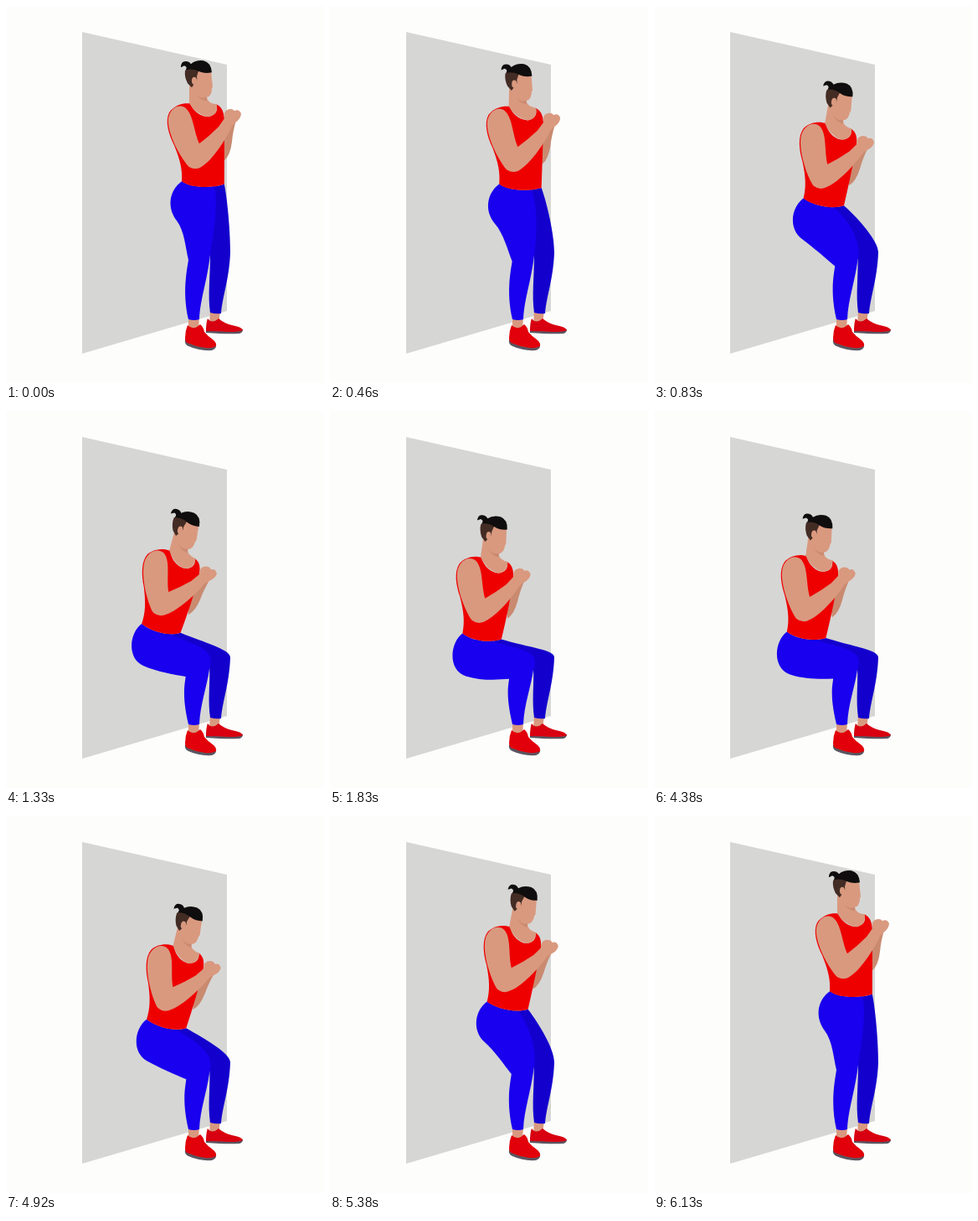
An HTML page that plays this animation: 380 px wide and 450 px high, repeating every 6180 ms.

```html
<!DOCTYPE html>
<html lang="en">
<head>
<meta charset="utf-8">
<title>Wall squat</title>
<style>
html, body { margin: 0; width: 100%; height: 100%; overflow: hidden; background: #fdfdfc; }
svg { display: block; width: 380px; height: 450px; }
.skin { fill: #d9997f; }
.shade { fill: #c98a70; }
.red { fill: #ee0000; }
.hair { fill: #0f0d0d; }
.crop { fill: #432c24; }
.sole { fill: #5a5560; }
</style>
</head>
<body>
<svg viewBox="0 0 380 450">
  <path fill="#d6d6d5" d="M91 31L264 70V364L91 415Z"/>

  <!-- feet -->
  <path class="skin" d="M244 363H256L254 380H243Z"/>
  <path class="sole" d="M239 384V390Q264 392 279 391Q283 390 283 386Z"/>
  <path fill="#d80010" d="M241 373Q246 380 254 373Q261 379 270 381Q282 383 283 387Q280 389 266 389Q252 388 239 388Q239 378 241 373Z"/>
  <path class="skin" d="M218 371H231L230 388H218Z"/>
  <path class="sole" d="M214 398Q213 404 218 406Q231 412 246 411Q252 409 251 404Z"/>
  <path fill="#e2000a" d="M217 381Q224 388 232 380Q236 383 237 389Q241 394 247 398Q252 402 251 406Q246 409 238 408Q228 407 219 403Q214 402 214 396Q214 388 217 381Z"/>

  <path id="farLeg" fill="#1400cd"/>
  <path id="nearLeg" fill="#1900ee"/>

  <g class="upper">
    <path class="shade" d="M263 134L275 136Q271 150 270 162Q268 178 261 184L257 170Z"/>
  </g>

  <path id="shirt" class="red"/>

  <g class="upper">
    <!-- neck and head -->
    <path class="skin" d="M219 88L240 100V109Q241 116 252 117Q253 130 242 132Q228 130 219 116Z"/>
    <path class="shade" d="M227 105Q234 112 240 108V113Q232 112 227 105Z"/>
    <path class="skin" d="M222 77H245Q246 87 247 96L246 98Q246 105 242 108Q236 110 229 105L219 92Z"/>
    <path class="crop" d="M214 77Q219 70 231 74L228 84Q229 90 226 91L222 97L217 92Q213 84 214 77Z"/>
    <ellipse class="skin" cx="225" cy="89" rx="3" ry="4.5"/>
    <path class="hair" d="M215 76Q217 72 213 71L209 73Q209 67 213 66Q218 65 221 69Q227 64 236 65Q245 67 246 79Q238 81 231 78Q224 74 215 76Z"/>
    <!-- near arm -->
    <path class="skin" d="M194 134C196 122 206 116 214 121C224 129 224 148 231 164Q243 155 254 144L261 134Q259 125 266 123Q271 122 273 125Q278 122 281 128Q281 134 274 139L270 143C264 157 248 182 236 190Q228 197 219 192C210 183 192 152 194 134Z"/>
  </g>
</svg>
<script>
const LOOP = 6180, RAD = Math.PI / 180;
const $ = id => document.getElementById(id);
const uppers = document.querySelectorAll('.upper');

const clamp = x => Math.min(1, Math.max(0, x));
const ease = x => (1 - Math.cos(Math.PI * x)) / 2;
const shift = (p, x, y) => [p[0] + x, p[1] + y];
const polar = (p, r, deg) => shift(p, r * Math.cos(deg * RAD), r * Math.sin(deg * RAD));

// Squat depth 0..1 and torso lean: quick way down, hold, even way up
function pose(t) {
  const down = t < 3000;
  const w = clamp(down ? (t - 320) / 1650 : (6100 - t) / 1950);
  const depth = ease(down ? w ** 0.65 : w);
  return { depth, lean: 7.2 * depth + 10.5 * Math.sin(Math.PI * w) ** 2 };
}

function draw(t) {
  const { depth: u, lean } = pose(t);

  // The hip swings about the knee and the waistline follows part of the lean
  const thigh = 9.4 + 53.6 * u;
  const hip = polar([225, 300], 92 - 17 * u, -90 - thigh);
  const waist = polar(hip, 51 - 4 * u, 4 + 0.6 * lean);
  const hem = `C${shift(waist, -16, 5)} ${shift(hip, 10, 8)} ${hip}`;

  const seat = shift(hip, -18, 31 + 13 * u);
  const under = shift(hip, 10 * u - 6, 47 + 4 * u);
  const flow = shift(under, 0.8 * (under[0] - seat[0]), 0.8 * (under[1] - seat[1]));
  const pit = [218 - 4 * u, 303 + 17 * u];
  const crotch = [244 - u, 297 + 12 * u];
  const knee = [268, 294];
  const lap = shift(waist, 4 + 30 * u, 20 - 10 * u);

  $('farLeg').setAttribute('d', `M${hip}L${crotch}C244 325 241 345 244 366Q251 368 257 367
    C259 345 267 325 ${knee}C${shift(knee, 0, -9 - 15 * (1 - u) ** 2)} ${lap} ${waist}${hem}Z`);
  $('nearLeg').setAttribute('d', `M${hip}C${shift(hip, -15, 11)} ${seat} ${under}
    C${flow} ${polar(pit, 15, -90 - 1.5 * thigh)} ${pit}
    C${shift(pit, -1, 9)} 210 340 218 374Q225 376 231 374C232 350 240 330 ${crotch}
    C${shift(crotch, 2 + 7 * u, -14 - 10 * u)} ${shift(lap, -10, 3)} ${shift(waist, -12, 2)}${hem}Z`);

  // Torso points are given for the upright pose with the hip at 210,209
  const c = Math.cos(lean * RAD), s = Math.sin(lean * RAD);
  const at = (x, y) => shift(hip, (x - 210) * c - (y - 209) * s, (x - 210) * s + (y - 209) * c);
  const curve = (...n) => 'C' + [0, 2, 4].map(j => at(n[j], n[j + 1])).join(' ');
  $('shirt').setAttribute('d', `M${hip}${curve(211, 195, 208, 183, 201, 166)}
    ${curve(194, 152, 190, 137, 195, 127)}${curve(199, 121, 206, 117, 214, 116)}
    L${at(220, 116)}${curve(225, 128, 235, 132, 242, 132)}${curve(251, 130, 254, 124, 251, 117)}
    ${curve(258, 120, 262, 126, 261, 145)}Q${at(261, 170)} ${waist}${hem}Z`);

  uppers.forEach(g => g.setAttribute('transform',
    `translate(${hip}) rotate(${lean}) translate(-210 -209)`));
}

function tick() {
  draw(performance.now() % LOOP);
  requestAnimationFrame(tick);
}
tick();
</script>
</body>
</html>
```
